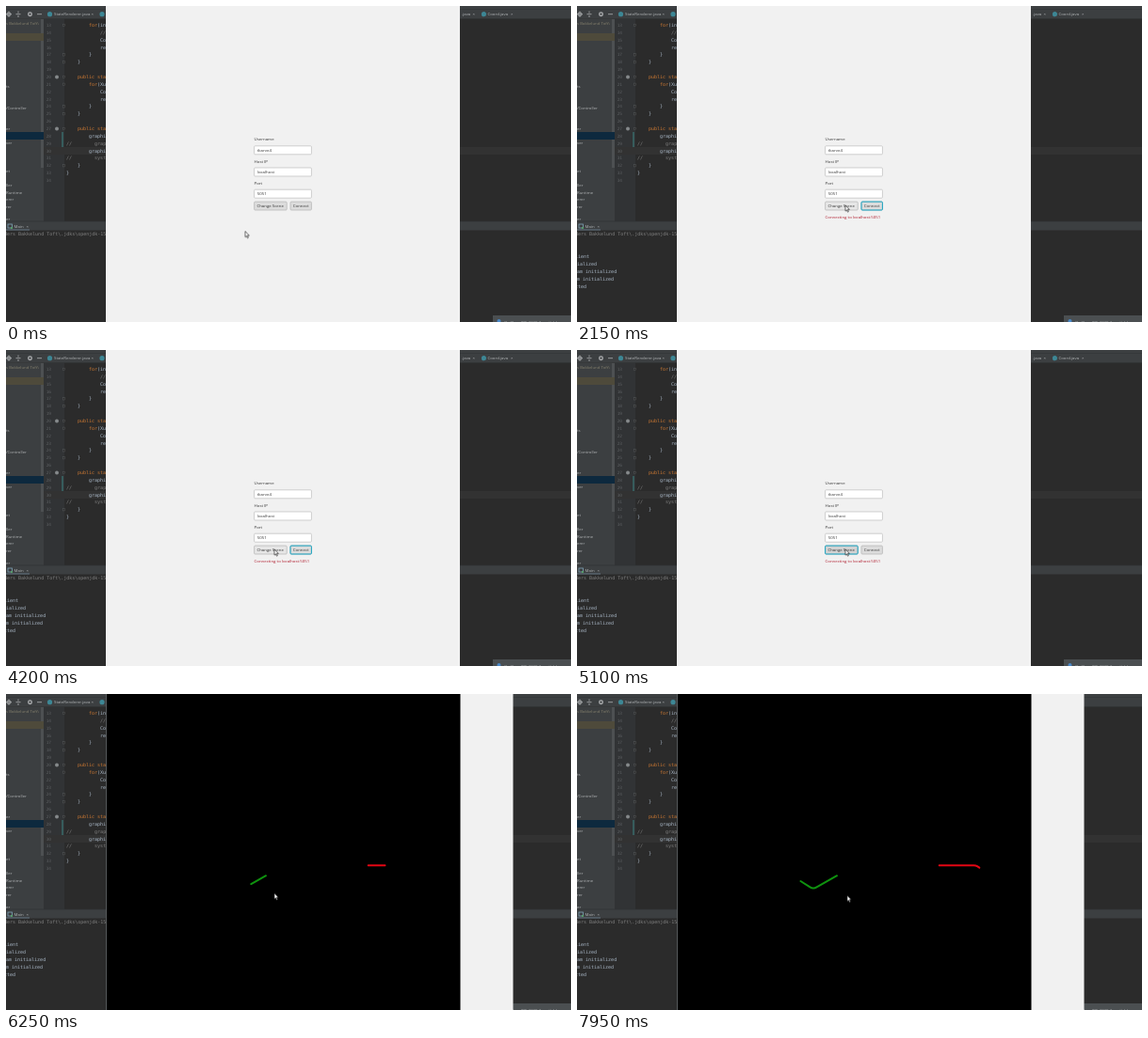
An HTML page for the animation above (8000 ms loop, 600 px wide and 336 px high).

```html
<!DOCTYPE html>
<html lang="en">
<head>
<meta charset="utf-8">
<title>Connect and play</title>
<style>
html, body { margin: 0; width: 100%; height: 100%; overflow: hidden; background: #2b2b2b; }
svg { display: block; width: 100vw; height: 100vh; }
text { font: 4.35px "Open Sans", "Noto Sans", sans-serif; white-space: pre; }
.ui { fill: #b4b7b9; }
.dim { fill: #85806d; }
.code { font: 5px "DejaVu Sans Mono", monospace; fill: #a9b7c6; }
.key { fill: #cc7832; }
.comment { fill: #808080; }
.num { font: 4.4px "DejaVu Sans Mono", monospace; fill: #5d6063; text-anchor: end; }
.label { fill: #333; }
.message { fill: #b01c2e; }
.field { fill: #fff; stroke: #bcbcbc; stroke-width: .7; }
.button { fill: #dcdcdc; stroke: #b3b3b3; stroke-width: .7; }
.focus { fill: none; stroke: #19a6c4; stroke-width: 1; }
.snake { fill: none; stroke-width: 2; stroke-linecap: round; stroke-linejoin: round;
  stroke-dasharray: 100 200; animation: grow 8s linear infinite; }
#form { animation: form 8s step-end infinite; }
#game { animation: game 8s step-end infinite; }
#output { animation: output 8s step-end infinite; }
#connectFocus { animation: connectFocus 8s step-end infinite; }
#message { animation: message 8s step-end infinite; }
#changeFocus { animation: changeFocus 8s step-end infinite; }
#change { animation: change 8s step-end infinite; }
#cursor { animation: cursor 8s ease-in-out infinite; }
@keyframes form { 0% { visibility: visible } 64.3%, 100% { visibility: hidden } }
@keyframes game { 0% { visibility: hidden } 64.3%, 100% { visibility: visible } }
@keyframes output { 0% { opacity: 0 } 17.5%, 100% { opacity: 1 } }
@keyframes connectFocus { 0% { opacity: 0 } 10%, 62% { opacity: 1 } 62.5%, 100% { opacity: 0 } }
@keyframes message { 0% { opacity: 0 } 11%, 100% { opacity: 1 } }
@keyframes changeFocus { 0% { opacity: 0 } 62.5%, 100% { opacity: 1 } }
@keyframes change { 0% { fill: #dcdcdc } 15% { fill: #e6e6e6 } 62.5%, 100% { fill: #d2d2d2 } }
@keyframes grow { 0%, 64.3% { stroke-dashoffset: 97 } 99.375%, 100% { stroke-dashoffset: 0 } }
@keyframes cursor {
  0%, 1% { transform: translate(254px, 239.5px) }
  8.5%, 12% { transform: translate(308px, 211.5px) }
  15% { transform: translate(298px, 213px) }
  19%, 88% { transform: translate(285px, 211.8px) }
  96%, 100% { transform: translate(287px, 214.3px) }
}
</style>
</head>
<body>
<svg viewBox="0 0 600 336" preserveAspectRatio="none">
  <rect width="600" height="336" fill="#2b2b2b"/>
  <rect x="40" y="13" width="22" height="216" fill="#313335"/>
  <rect x="40" y="150" width="560" height="8" fill="#323232"/>
  <rect x="59" y="134" width="2" height="16" fill="#375c5c"/>
  <g id="editor"></g>

  <rect width="600" height="13.5" fill="#3c3f41"/>
  <path d="M0 3.5H600M0 13.5H600" stroke="#323537" stroke-width=".6"/>
  <rect y="13.5" width="40" height="215.5" fill="#3c3f41"/>
  <rect x="37" y="14" width="3" height="158" fill="#4d5052"/>
  <rect y="29" width="40" height="8" fill="#4e4a3b"/>
  <rect y="134" width="40" height="8" fill="#0d293e"/>
  <g fill="none" stroke="#afb1b3" stroke-width=".8">
    <circle cx="3" cy="8.7" r="2"/><path d="M3 5.7V11.7M0 8.7H6"/>
    <path d="M10.5 8.7H15.5M13 5.5V7.5M13 10V12M33 8.7H38"/>
    <circle cx="25.5" cy="8.7" r="1.8" stroke-width="1.3"/>
  </g>
  <g fill="#3d8795">
    <circle cx="46.5" cy="8.7" r="2.6"/><circle cx="102" cy="8.7" r="2.6"/><circle cx="507.5" cy="8.7" r="2.6"/>
  </g>
  <rect y="229" width="600" height="9.5" fill="#3c3f41"/>
  <path d="M0 229H600" stroke="#303234" stroke-width=".7"/>
  <path d="M0 238H25" stroke="#667684" stroke-width="1"/>
  <rect x="2" y="232" width="4.5" height="4" fill="none" stroke="#7fa3b8" stroke-width=".8"/>
  <circle cx="6" cy="236" r="1" fill="#55a864"/>
  <g id="panels"></g>
  <g id="output"></g>
  <rect x="517" y="329" width="83" height="7" fill="#4b4f51"/>
  <circle cx="523.5" cy="335" r="2" fill="#4a88c7"/>
  <g id="notice"></g>

  <g id="form">
    <rect x="106" width="376" height="336" fill="#f1f1f1"/>
    <g id="fields"></g>
    <rect id="change" class="button" x="263.6" y="208.1" width="34.6" height="8.9" rx="1"/>
    <rect class="button" x="302" y="208.1" width="22.4" height="8.9" rx="1"/>
    <rect id="changeFocus" class="focus" x="263.6" y="208.1" width="34.6" height="8.9" rx="1"/>
    <rect id="connectFocus" class="focus" x="302" y="208.1" width="22.4" height="8.9" rx="1"/>
    <text class="label" x="266.4" y="214.2">Change Scene</text>
    <text class="label" x="304.8" y="214.2">Connect</text>
    <text id="message" class="message" x="263.6" y="226.1">Connecting to localhost:5051</text>
  </g>

  <g id="game">
    <rect x="106" width="432.5" height="336" fill="#f1f1f1"/>
    <rect x="106" width="1" height="336" fill="#55585a"/>
    <rect x="107" width="375.5" height="336"/>
    <path class="snake" pathLength="100" stroke="#0f930f" d="M276 193.2L254.5 205.3Q251 207.5 247.5 205.3L237.5 199"/>
    <path class="snake" pathLength="100" stroke="#e30613" d="M384.7 182.2H421.5Q423.5 182.2 425 183.2L427.3 184.7"/>
  </g>
  <path id="cursor" d="M0 0V6.2L1.4 5L2.4 7.2L3.4 6.8L2.4 4.6H4.3Z" fill="#fff" stroke="#111" stroke-width=".6"/>
</svg>
<script>
const byId = id => document.getElementById(id);

function add(parent, tag, attrs, content = '') {
  const node = document.createElementNS('http://www.w3.org/2000/svg', tag);
  for (const name in attrs) node.setAttribute(name, attrs[name]);
  node.textContent = content;
  byId(parent).append(node);
  return node;
}

// The y of every text is its visual centre line.
const write = (parent, x, y, content, cls) =>
  add(parent, 'text', { x, y: y + 1.6, class: cls }, content);

const lineY = n => 154 + (n - 30) * 7.86;
for (let n = 13; n <= 34; n++) write('editor', 48, lineY(n), n, 'num');

const method = (first, loop) => [
  [first, 88, 'for', 'code key'], [first, 97, loop, 'code'],
  [first + 2, 100, 'Co', 'code'], [first + 3, 100, 're', 'code'],
  [first + 4, 88, '}', 'code'], [first + 5, 76, '}', 'code']
].map(row => row[0] > 20 && row[0] !== first ? [row[0] - 1, ...row.slice(1)] : row);

[
  ...method(13, '(in'), [14, 100, '//', 'code comment'],
  [20, 76, 'public sta', 'code key'], ...method(21, '(Xu'),
  [27, 76, 'public sta', 'code key'],
  [28, 88, 'graphi', 'code'], [30, 88, 'graphi', 'code'],
  [29, 64, '//        grap', 'code comment'], [31, 64, '//        syst', 'code comment'],
  [32, 76, '}', 'code'], [33, 64, '}', 'code']
].forEach(([n, x, content, cls]) => write('editor', x, lineY(n), content, cls));

for (const n of [20, 27]) add('editor', 'circle', { cx: 54, cy: lineY(n), r: 2, fill: '#85898b' });
for (const n of [13, 17, 18, 20, 21, 24, 25, 27, 32])
  add('editor', 'rect', { x: 60.5, y: lineY(n) - 1.2, width: 2, height: 2.4, fill: '#2b2b2b', stroke: '#56595b', 'stroke-width': .5 });

[
  [51, 8.7, 'StateRenderer.java'], [90.5, 8.7, '×'], [484, 8.7, '.java'], [495.5, 8.7, '×'],
  [511.5, 8.7, 'Coord.java'], [536, 8.7, '×'], [8.5, 234, 'Main'], [21.5, 234, '×'],
  [0, 85.5, 'ts'], [0, 108, '/Controller'], [0, 130.5, 'er'], [0, 145.5, 'ver'],
  [0, 175.5, 'et'], [0, 190.5, 'ller'], [0, 198, 'Runtime'], [0, 205.5, 'erer'],
  [0, 213, 'rer'], [0, 226, 'er']
].forEach(([x, y, content]) => write('panels', x, y, content, 'ui'));
write('panels', 0, 18, 's Bakkelund Toft\\', 'dim');
write('panels', -2, 242.7, 'ders Bakkelund Toft\\.jdks\\openjdk-15', 'code comment');
['lient', 'ialized', 'am initialized', 'm initialized', 'cted'].forEach((line, i) =>
  write('output', line === 'lient' || line === 'cted' ? -2 : 0, 266.7 + i * 7.86, line, 'code'));
write('notice', 529, 336, 'Quillbay IDE 2020.3 available', 'ui');

[['Username', 'tkarve4'], ['Host IP', 'localhost'], ['Port', '5051']].forEach(([name, value], i) => {
  const y = 141.7 + i * 23.2;
  write('fields', 263.6, y, name, 'label');
  add('fields', 'rect', { x: 263.6, y: y + 7.1, width: 60.8, height: 9, rx: 1, class: 'field' });
  write('fields', 266.8, y + 11.6, value, 'label');
});
</script>
</body>
</html>
```
